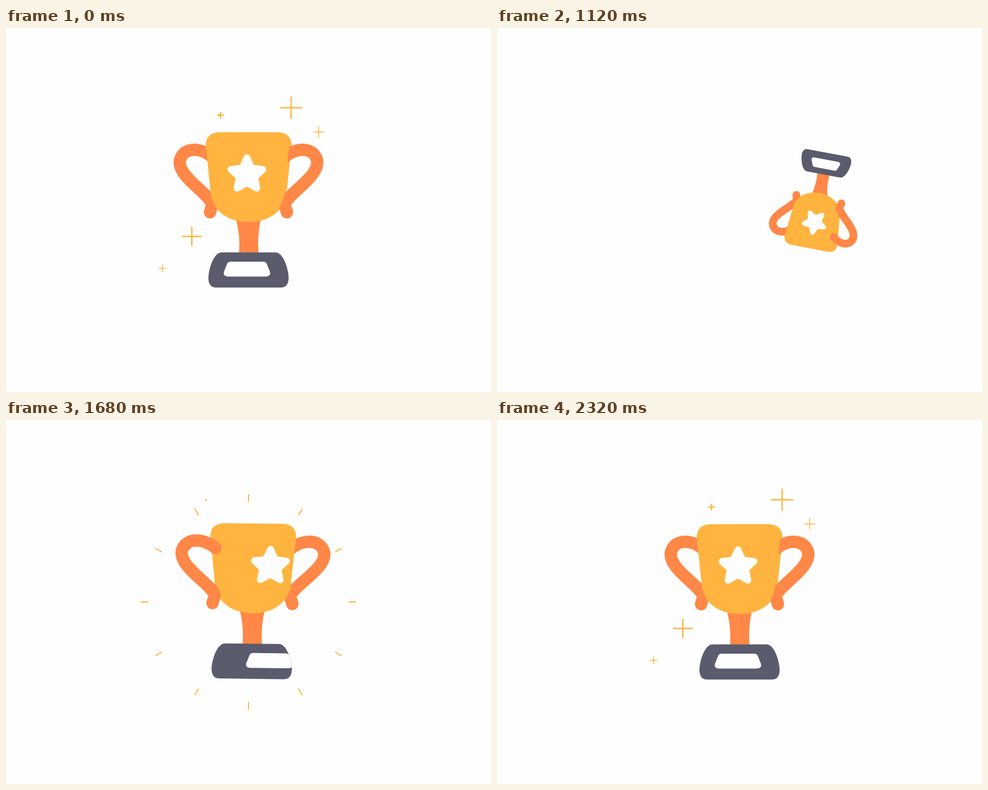
These frames come from a looping animation (864 by 648 pixels, 2.36 s). An HTML page with a canvas:

```html
<!DOCTYPE html>
<html>
<head>
<meta charset="utf-8">
<style>
html, body { margin: 0; width: 100%; height: 100%; overflow: hidden; background: #fefefe; }
canvas { display: block; }
</style>
</head>
<body>
<canvas id="stage" width="864" height="648"></canvas>
<script>
const ctx = document.getElementById('stage').getContext('2d');
const LOOP = 2360, CYCLE = 2320, STEP = 40;
const TOSS = 600, FAR = 1000, LAND = 1240;
const CX = 432, CY = 324;
const GOLD = '#ffb43f', ORANGE = '#ff8747', SLATE = '#5b5b6e', WHITE = '#fefefe';

const cup = new Path2D('M380 185.5H485Q509 187 508.5 210L500 292C498 327 466 345.5 432 345.5C398 345.5 367 327 364.5 292L356 210Q355 187 380 185.5Z');
const stem = new Path2D('M409.5 340Q418 370 415 402H450Q447 370 454 340Z');
const base = new Path2D('M384 399.5H480C494 399.5 503 428 503.5 445Q503 462 490 462H374Q361 462 360.5 445C361 428 370 399.5 384 399.5Z');
const plaque = new Path2D('M403 416H461Q465 416 467 419L473 434Q475 442 466 442.5H398Q389 442 391 434L397 419Q399 416 403 416Z');
const handle = new Path2D('M365 230C345 213 312 210 305 236C301 264 355 292 364 312C366 320 361 322 361 328');

const star = new Path2D();
for (let i = 0; i < 10; i++) {
  const r = i % 2 ? 14.5 : 30, a = i * Math.PI / 5;
  star.lineTo(CX + r * Math.sin(a), 261 - r * Math.cos(a));
}
star.closePath();

const clamp = u => Math.min(1, Math.max(0, u));
const progress = (t, from, to) => clamp((t - from) / (to - from));
const easeOut = u => 1 - (1 - clamp(u)) ** 3;
const smooth = u => u * u * (3 - 2 * u);
const sigmoid = (t, middle, width) => 1 / (1 + Math.exp((middle - t) / width));

// The cup is tossed away, swings back from the right and settles
function pose(t) {
  const q = progress(t, TOSS, LAND);
  const swing = Math.sin(Math.PI * progress(t, FAR, LAND)) ** 2;
  const away = t < FAR ? progress(t, TOSS, FAR) : 1 - progress(t, FAR, LAND);
  const left = 1 - progress(t, LAND, CYCLE);
  const sway = Math.cos(Math.PI * Math.max(0, t - LAND) / 440);
  return {
    x: CX + 155 * swing - 20 * q ** 1.7 * left ** 2 * sway,
    y: CY - 45 * Math.sin(Math.PI * q) + 10 * q * left ** 4 * sway,
    tilt: (360 * q ** 3.13 + 5.2 * q ** 3.13 * left ** 4) * Math.PI / 180,
    size: 1 - 0.75 * smooth(away)
  };
}

// A stroke that shoots outward from r0 to r1, its tail following
function ray(x, y, angle, r0, r1, age, width) {
  const life = 400;
  if (age >= life) return;
  const outer = r0 + (r1 - r0) * easeOut(age / 200);
  const inner = r0 + (r1 - r0) * easeOut((age - 120) / 280);
  const c = Math.cos(angle), s = Math.sin(angle);
  ctx.lineWidth = width * (1 - (age / life) ** 3);
  ctx.beginPath();
  ctx.moveTo(x + inner * c, y + inner * s);
  ctx.lineTo(x + outer * c, y + outer * s);
  ctx.stroke();
}

function burst(count, turn, x, y, r0, r1, age, width) {
  for (let i = 0; i < count; i++)
    ray(x, y, turn + i * 2 * Math.PI / count, r0, r1, age, width);
}

// Each big sparkle has a small companion at dx, dy
const sparkles = [
  { x: 356, y: 142, dx: -49, dy: 43, start: 1679 },
  { x: 533, y: 371, dx: 52, dy: 57, start: 1710 },
  { x: 482, y: 155, dx: 51, dy: 56, start: 1775 },
  { x: 275, y: 341, dx: 50, dy: 56, start: 1895 }
];

function drawRays(t) {
  const age = start => (t - start + 2 * CYCLE) % CYCLE;
  ctx.strokeStyle = GOLD;
  ctx.lineCap = 'round';
  for (const { x, y, dx, dy, start } of sparkles) {
    // The second round is the mirror image of the first
    for (const [side, begin] of [[1, start], [-1, start + 528]]) {
      const place = px => CX + side * (px - CX);
      burst(4, 0, place(x), y, 0, 20.5, age(begin), 2.5);
      burst(4, 0, place(x + dx), y + dy, 0, 12.5, age(begin + 40), 1.5);
    }
  }
  burst(12, 0, CX, CY, 120, 191, age(1435), 2.6);
  burst(12, Math.PI / 12, CX, CY, 116, 165, age(1239), 1.5);
}

function within(clip, draw, rule = 'nonzero') {
  ctx.save();
  ctx.clip(clip, rule);
  draw();
  ctx.restore();
}

function fill(path, color) {
  ctx.fillStyle = color;
  ctx.fill(path);
}

function drawHandle(k) {
  const p = new Path2D();
  p.addPath(handle, new DOMMatrix([k, 0, 0, 1, CX * (1 - k), 0]));
  ctx.strokeStyle = ORANGE;
  ctx.lineWidth = 22;
  ctx.stroke(p);
}

function drawTrophy(t) {
  const late = t < TOSS ? t + CYCLE : t;
  const slide = 220 * sigmoid(late, 1867, 104);
  const shift = slide > 110 ? slide - 220 : slide;
  const turn = 2 * Math.PI * sigmoid(late, 1676, 208);
  const depth = Math.sin(turn);
  const front = Math.cos(turn) * (depth > 0 ? 1 : -1);
  const crossing = Math.abs(depth) > 0.1 || (late > 1400 && late < 2000);
  const { x, y, tilt, size } = pose(t);

  ctx.save();
  ctx.translate(x, y);
  ctx.rotate(tilt);
  ctx.scale(size, size);
  ctx.translate(-CX, -CY);
  ctx.lineCap = ctx.lineJoin = 'round';

  fill(stem, ORANGE);
  drawHandle(-front);
  if (!crossing) drawHandle(front);
  fill(base, SLATE);
  within(base, () => {
    ctx.translate(shift, 0);
    fill(plaque, WHITE);
  });
  fill(cup, GOLD);
  within(cup, () => {
    ctx.translate(shift, 0);
    fill(star, WHITE);
    ctx.strokeStyle = WHITE;
    ctx.lineWidth = 12;
    ctx.stroke(star);
  });
  if (crossing) {
    // While the star returns, the sliding cup outline hides the handle's end
    const outside = new Path2D();
    outside.rect(-500, -500, 2000, 2000);
    if (shift < 0) outside.addPath(cup, new DOMMatrix([1, 0, 0, 1, 1.5 * shift, 0]));
    within(outside, () => drawHandle(front), 'evenodd');
  }
  ctx.restore();
}

function frame() {
  const t = Math.min(CYCLE, Math.floor(performance.now() % LOOP / STEP) * STEP);
  ctx.fillStyle = WHITE;
  ctx.fillRect(0, 0, 864, 648);
  drawRays(t);
  drawTrophy(t);
  requestAnimationFrame(frame);
}
frame();
</script>
</body>
</html>
```
